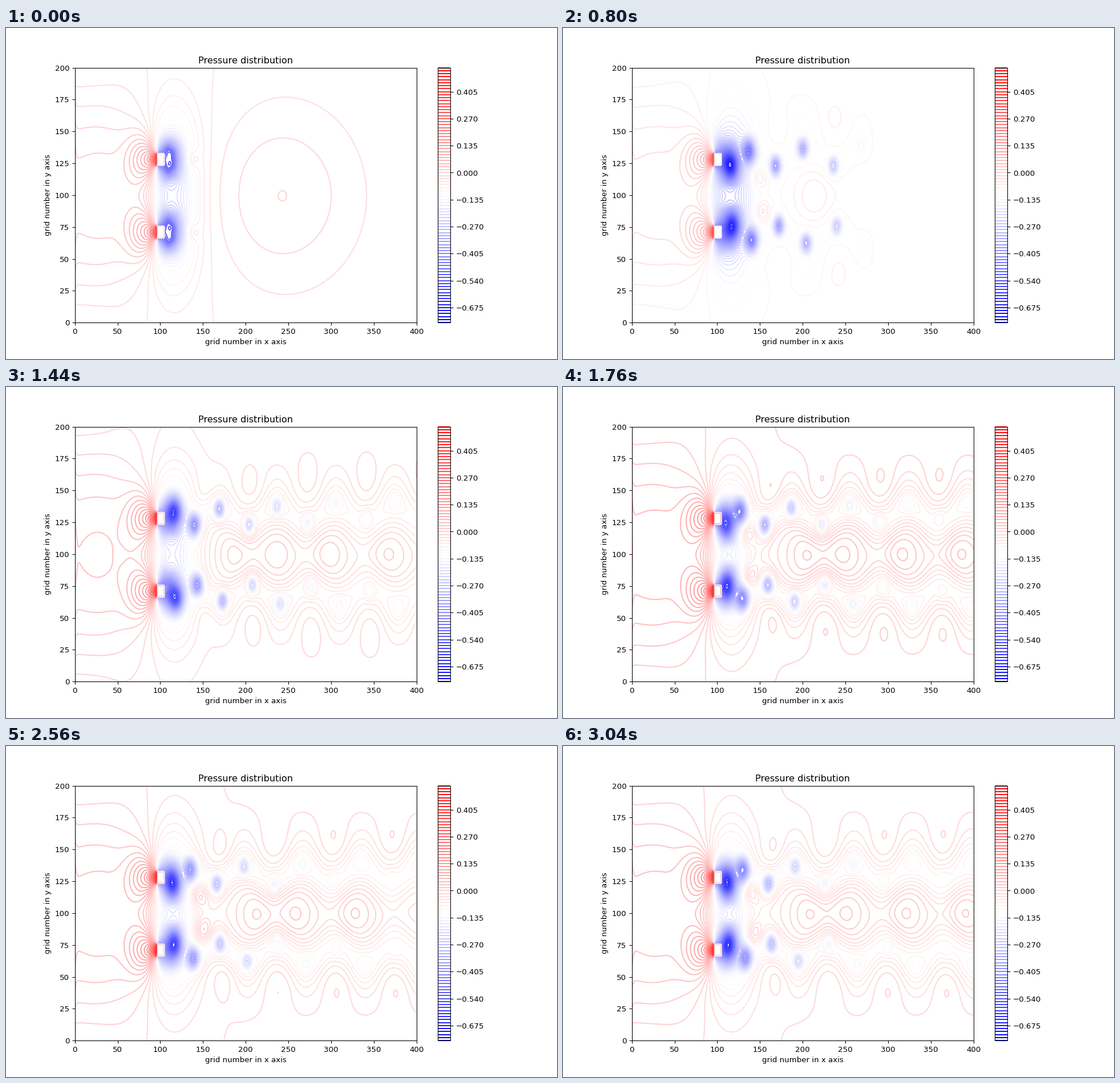
These frames come from a looping animation (966x580 px, 3200 ms). A matplotlib script:

```python
import numpy as np
import matplotlib.pyplot as plt
from matplotlib.animation import ArtistAnimation

FRAMES, INTERVAL = 20, 160
STEP = 0.015
LEVELS = np.arange(-50, 36) * STEP
X, Y = np.meshgrid(np.arange(401.0), np.arange(201.0))

FACE_X, BODY_Y, HALF = 95.5, 128.0, 5.0   # upper square; the lower one mirrors it
MIRROR = 199.0
WAVELENGTH, SPEED = 69.0, 43.7            # vortex spacing and travel per frame

KEYS = [0, 3, 7, 11, 14, 16, 19]
AMBIENT = [-0.045, -0.13, -0.045, 0.001, -0.03, -0.015, -0.015]
BAND = [0, 0, 0.03, 0.075, 0.05, 0.07, 0.07]


def gauss(x, y, cx, cy, sx, sy):
    return np.exp(-((x - cx) / sx) ** 2 / 2 - ((y - cy) / sy) ** 2 / 2)


def sigmoid(z):
    return 1 / (1 + np.exp(-np.clip(z, -60, 60)))


def near_x(s):
    """Vortices start slowly behind the body, then drift at constant speed."""
    return 100 + 25 * np.logaddexp(0, (s - 100) / 25)


def train(start, n):
    """Drift coordinates of all vortices of one row."""
    first = (start + SPEED * (n - 14)) % WAVELENGTH
    s = first + WAVELENGTH * np.arange(7)
    return s[(s > 65) & (s < 440)]


def body(y):
    """Pressure ahead of a square face, suction behind its corners."""
    d = FACE_X - X
    v = y - BODY_Y
    angle = np.arctan((v + HALF) / d) - np.arctan((v - HALF) / d)
    p = 0.53 / np.pi * angle * np.exp(-np.maximum(-d, 0) / 40)
    p += 0.05 * gauss(X, y, 80, BODY_Y, 13, 14) * sigmoid((91 - X) / 2.5)
    return p - 0.1 * gauss(X, y, 116, BODY_Y, 18, 28)


def startup(y, n):
    """Symmetric bubble at rest, then the first pair that rolls off it."""
    p = np.zeros_like(X)
    still = max(0, 1 - n / 3)
    if still:
        for cx, cy in [(109, 136), (115, 133), (115, 124), (109, 120)]:
            p -= 0.06 * still * gauss(X, y, cx, cy, 3, 3)
        p += 0.045 * still * gauss(X, y, 138, 128, 5.5, 5.5)
    rolled = np.interp(n, [0, 3, 5], [0, 1, 0])
    if rolled:
        dx = 35 * (n - 3) if n > 3 else 12 * (n - 3)
        p -= rolled * (0.22 * gauss(X, y, 142 + dx, 137, 7, 7)
                       + 0.16 * gauss(X, y, 120 + dx / 3, 122, 6, 6)
                       + 0.14 * gauss(X, y, 130 + dx / 2, 130, 17, 17)
                       - 0.08 * gauss(X, y, 148 + dx, 119, 6, 6)
                       + 0.05 * gauss(X, y, 164 + dx, 118, 6, 6))
    return p


def street(y, n, lag):
    """Outer and inner vortex rows with the pockets between them."""
    grown = np.interp(n, [3, 5], [0, 1])
    p = np.zeros_like(X)
    if not grown:
        return p
    front = 185 + 40 * (n - 3)
    decay = 80 + 80 * np.exp(-max(n - 7, 0) / 2.5)

    for start, outer in [(248 + lag, True), (215 + lag, False)]:
        for s in train(start, n):
            cx = near_x(s)
            live = grown * sigmoid((front - cx) / 8)
            core = 0.36 * np.exp(-(cx - 110) / decay) * np.clip((s - 65) / 25, 0, 1)
            size = 4.2 + 2.6 * np.exp(-(cx - 110) / 30)
            if outer:
                cy = 134 + 0.032 * (cx - 128)
                px, py = cx + 37, 150 + 10 * np.clip((cx - 130) / 70, 0, 1)
                gain, wx, wy = 0.014, 11, 11
                crest = 0.025 * np.clip((cx - 140) / 50, 0, 1)
                p -= live * crest * gauss(X, y, cx, 152, 15, 15)
            else:
                cy = 123 + 0.05 * max(cx - 235, 0)
                px = cx + np.interp(cx, [150, 225, 295], [-20, -19, -46])
                py = 99.5 + 17 * np.clip((185 - px) / 45, 0, 1)
                gain, wx, wy = 0.022, 16, 15
                if px < 160:
                    gain, wx, wy = 0.07, 7, 7
            p -= live * core * gauss(X, y, cx, cy, size, size * 1.2)
            if px > 125:
                p += live * gain * gauss(X, y, px, py, wx, wy)

    phase = 2 * np.pi * (X - 248 - lag - SPEED * (n - 14)) / WAVELENGTH
    centre = 130 + 7 * np.cos(phase)
    width = 9 + 0.013 * np.maximum(X - 150, 0)
    reach = sigmoid((X - 140) / 6) * sigmoid((front - X) / 10)
    depth = np.interp(n, KEYS, BAND)
    return p - depth * reach * np.exp(-((y - centre) / width) ** 2 / 2)


def pressure(n):
    ambient = np.interp(n, KEYS, AMBIENT)
    bubble = np.interp(n, [0, 3, 7], [0.26, 0.14, 0.14])
    young = np.interp(n, [0, 3, 6], [0, 1, 0])

    arch = np.cos(np.pi * (Y - 99.5) / 200)
    inlet = sigmoid((45 - X) / 12)
    p = ambient + 0.005 * sigmoid((X - 100) / 10)
    p = p + inlet * (0.052 * arch - 0.0174 - 0.009 * young)
    p += 0.012 * arch * np.exp(-X / 1.2)
    p -= 0.006 * (1 - young) * np.exp(-((X - 118) / 60) ** 2)
    p += 0.0408 * np.exp(-n) * gauss(X, Y, 241, 99.5, 60, 47)
    p -= 0.013 * young * gauss(X, Y, 225, 101, 32, 30)

    for y, lag in [(Y, 0), (MIRROR - Y, 4)]:
        p += body(y) + startup(y, n) + street(y, n, lag)
        p -= bubble * gauss(X, y, 110, BODY_Y, 8.5, 10)

    for y in (Y, MIRROR - Y):
        p[(X > 95) & (X < 105) & (abs(y - BODY_Y) < HALF)] = ambient
    return p


fig, ax = plt.subplots(figsize=(10, 6.005), dpi=96.6)
sets = [ax.contour(X, Y, pressure(n), levels=LEVELS, cmap="bwr",
                   vmin=LEVELS[0], vmax=LEVELS[-1]) for n in range(FRAMES)]
fig.colorbar(sets[0], ax=ax)
ax.set(xlim=(0, 400), ylim=(0, 200), title="Pressure distribution",
       xlabel="grid number in x axis", ylabel="grid number in y axis")

anim = ArtistAnimation(fig, [[cs] for cs in sets], interval=INTERVAL,
                       repeat=True, repeat_delay=0)
plt.show()
```
